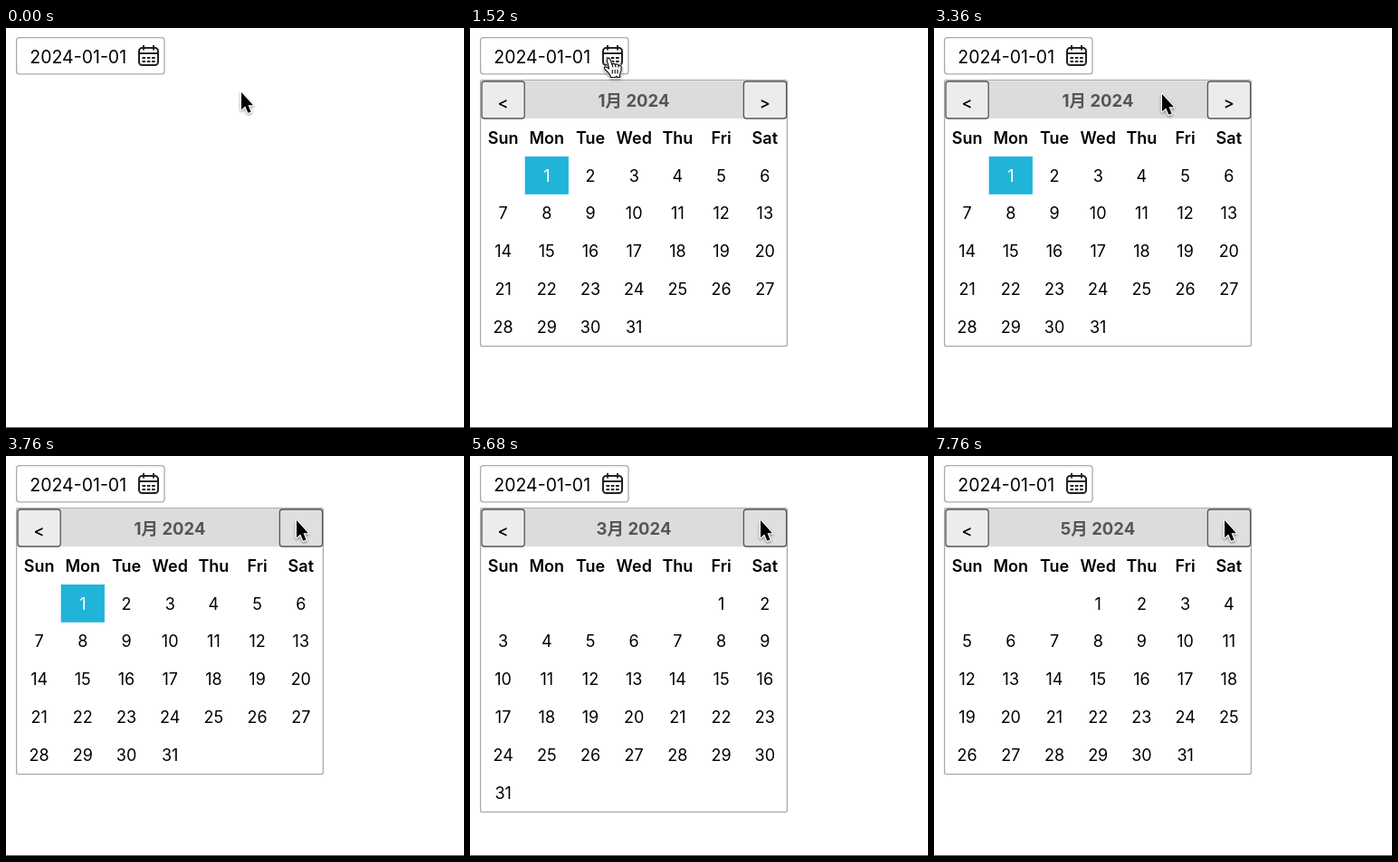
Animation of 506x442 px, one loop 8000 ms. Source, as an HTML page with a canvas:

```html
<!DOCTYPE html>
<html lang="en">
<head>
<meta charset="utf-8">
<title>Date picker</title>
<style>
  html, body { margin: 0; width: 100%; height: 100%; overflow: hidden; background: #fff; }
  canvas { display: block; width: 506px; height: 442px; }
</style>
</head>
<body>
<canvas id="stage"></canvas>
<script>
const W = 506, H = 442, LOOP = 8000, STEP = 80;
const FONT = 'Inter, "Noto Sans CJK SC", "Noto Sans CJK JP", "Noto Sans CJK", sans-serif';
const COL = 48.2, ROW = 41.8, LEFT = 36.6;
const canvas = document.getElementById('stage');
const ctx = canvas.getContext('2d');
const dpr = window.devicePixelRatio || 1;
canvas.width = W * dpr;
canvas.height = H * dpr;

// Pointer path: [time, x, y]
const path = [
  [0, 260, 71], [160, 246, 67], [320, 212, 56], [480, 176, 43], [640, 156, 35], [720, 153, 34],
  [2560, 153, 34], [2720, 182, 51], [2880, 205.5, 67],
  [3120, 205.5, 67], [3360, 252, 73], [3520, 292, 74], [3680, 317, 72], [3760, 321, 71]
];
// Month shown from each time on
const months = [[1520, 1], [4320, 2], [5680, 3], [6720, 4], [7760, 5]];

const arrow = new Path2D('M0 0V19.2L4.2 15.4L7.4 22.8L10.6 21.4L7.5 14.2H13Z');
const hand = new Path2D('M-1.8 1.6C-1.9 -.8 1.5 -1 2.2 1.1L4 6.2C5 4.9 7 5.1 7.5 6.6' +
  'C8.6 5.5 10.5 5.8 11 7.4C12.3 6.6 14 7.3 14.2 9.2C14.6 12.2 14.2 14.5 12.6 17V20.5H9.8L8.8 19.3' +
  'L7.6 20.5H2.6C1.8 17 -.6 15 -3.6 12C-5.8 9.6 -3.6 8 -1.5 9.4L.7 11Z');
const handLines = new Path2D('M4 6.2L5 9.3M7.5 6.6L8.1 9.3M11 7.4L11.3 9.6M4.3 12V16.5M7.2 12V16.5M10 12V16.5');

function pointerAt(t) {
  const i = path.findIndex(p => p[0] >= t);
  if (i < 0) return path[path.length - 1].slice(1);
  if (i === 0) return path[0].slice(1);
  const a = path[i - 1], b = path[i], k = (t - a[0]) / (b[0] - a[0]);
  return [a[1] + (b[1] - a[1]) * k, a[2] + (b[2] - a[2]) * k];
}

function text(str, x, y, size, weight = 400, color = '#000', align = 'center') {
  ctx.font = `${weight} ${size}px ${FONT}`;
  ctx.textAlign = align;
  ctx.fillStyle = color;
  ctx.fillText(str, x, y);
}

function box(x, y, w, h, r, fill, stroke, line = 1.3) {
  ctx.beginPath();
  ctx.roundRect(x, y, w, h, r);
  ctx.fillStyle = fill;
  ctx.fill();
  ctx.strokeStyle = stroke;
  ctx.lineWidth = line;
  ctx.stroke();
}

function drawField() {
  box(11.6, 10.6, 163.4, 40.2, 3, '#fff', '#aaa');
  text('2024-01-01', 26.3, 39, 19.5, 400, '#000', 'left');
  box(147, 22, 21, 19, 3.5, '#fff', '#222', 2);
  ctx.fillStyle = '#222';
  ctx.fillRect(147, 27, 21, 2);
  for (const x of [151, 162]) ctx.fillRect(x, 19, 2, 5.5);
  for (const y of [32, 36])
    for (const x of [150.5, 155.8, 161.1]) ctx.fillRect(x, y, 3.6, 2);
}

function drawCalendar(month, hoverNext) {
  const first = new Date(2024, month - 1, 1).getDay();
  const days = new Date(2024, month, 0).getDate();
  const rows = Math.ceil((first + days) / 7);
  box(11.6, 57.6, 338.8, 85 + rows * ROW, 2, '#fff', '#aaa');
  ctx.fillStyle = '#dcdcdc';
  ctx.fillRect(12.3, 58.3, 337.4, 41.7);
  text(`${month}月 2024`, 181, 86.5, 18.5, 700, '#555');
  box(13, 59, 47.2, 41, 3, '#ececec', '#555');
  box(302.4, 59, 47.2, 41, 3, hoverNext ? '#dfdfdf' : '#ececec', '#555');
  text('<', LEFT, 89, 18, 500);
  text('>', LEFT + 6 * COL, 89, 18, 500);

  ['Sun', 'Mon', 'Tue', 'Wed', 'Thu', 'Fri', 'Sat'].forEach((name, i) =>
    text(name, LEFT + i * COL, 128, 18, 600));
  for (let day = 1; day <= days; day++) {
    const cell = first + day - 1;
    const x = LEFT + cell % 7 * COL, y = 169.6 + Math.floor(cell / 7) * ROW;
    const selected = month === 1 && day === 1;
    if (selected) {
      ctx.fillStyle = '#20b4d8';
      ctx.fillRect(x - COL / 2, y - 27.6, COL, ROW);
    }
    text(day, x, y, 18, 400, selected ? '#fff' : '#000');
  }
}

function drawPointer(x, y) {
  const overIcon = x < 169 && y < 43;
  ctx.save();
  ctx.translate(x, y);
  ctx.lineJoin = 'round';
  ctx.shadowColor = 'rgba(0,0,0,.4)';
  ctx.shadowBlur = 3 * dpr;
  ctx.shadowOffsetY = 1.5 * dpr;
  ctx.strokeStyle = '#fff';
  ctx.lineWidth = 2.4;
  const shape = overIcon ? hand : arrow;
  ctx.stroke(shape);
  ctx.shadowColor = 'transparent';
  ctx.fillStyle = overIcon ? '#fff' : '#000';
  ctx.fill(shape);
  if (overIcon) {
    ctx.strokeStyle = '#111';
    ctx.lineWidth = 1.2;
    ctx.stroke(hand);
    ctx.stroke(handLines);
  }
  ctx.restore();
}

function draw(now) {
  const t = Math.floor(now % LOOP / STEP) * STEP;
  const [x, y] = pointerAt(t);
  const shown = months.filter(m => m[0] <= t).pop();
  ctx.setTransform(dpr, 0, 0, dpr, 0, 0);
  ctx.fillStyle = '#fff';
  ctx.fillRect(0, 0, W, H);
  ctx.fillStyle = '#666';
  ctx.fillRect(0, 441, W, 1);
  drawField();
  if (shown) drawCalendar(shown[1], x > 302);
  drawPointer(x, y);
}

const start = performance.now();
function tick() {
  draw(performance.now() - start);
  requestAnimationFrame(tick);
}
tick();
</script>
</body>
</html>
```
